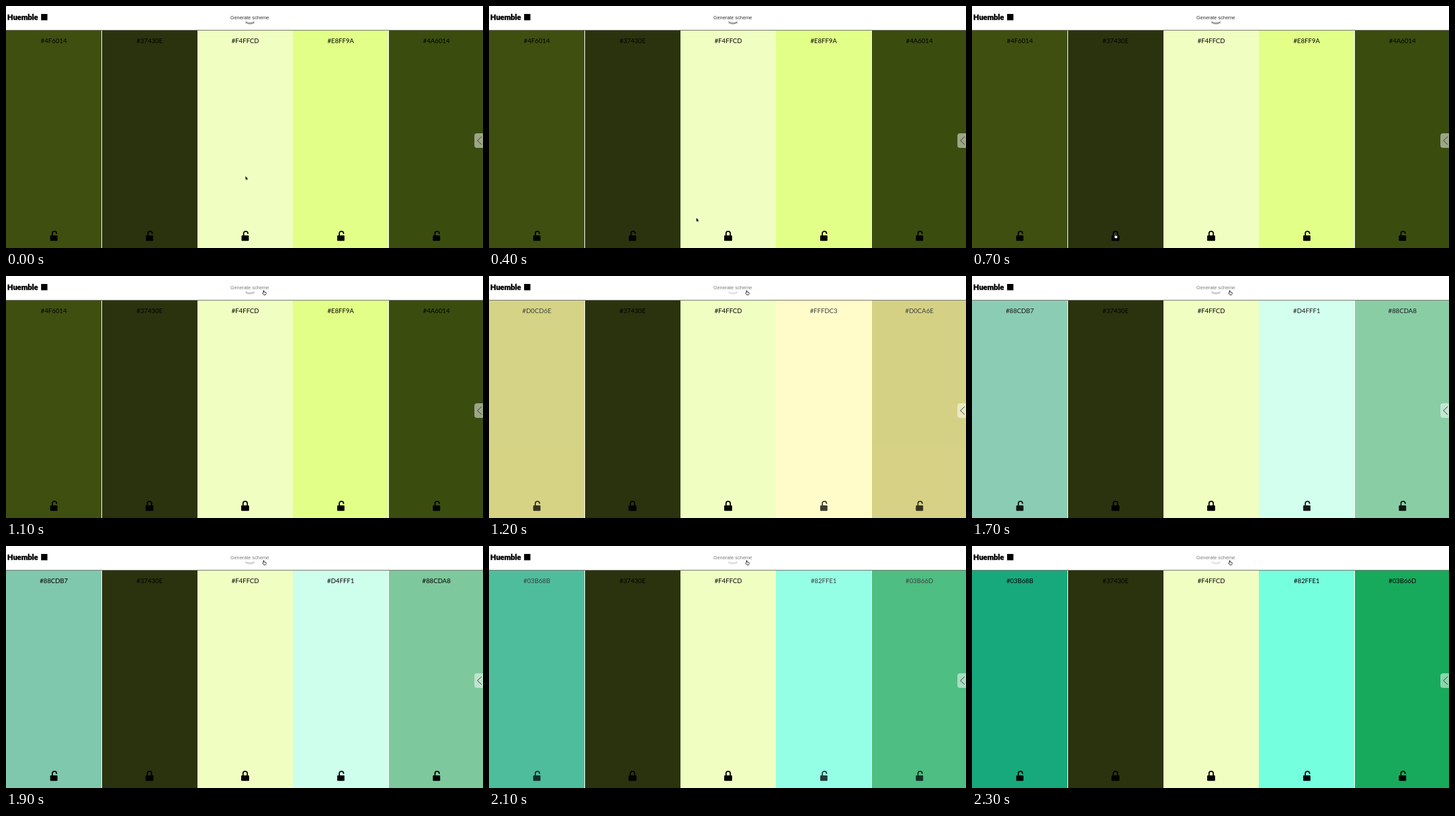
Recreate the animation shown at these times as an HTML page with a canvas. Size 720x365 px, loop 2.4 s.

```html
<!DOCTYPE html>
<html lang="en">
<head>
<meta charset="utf-8">
<title>Colour schemes</title>
<style>
  html, body { margin: 0; width: 100%; height: 100%; overflow: hidden; background: #fff; }
  #stage { position: relative; width: 720px; height: 365px; overflow: hidden; }
  #stage > * { position: absolute; }
  .name { left: 2px; top: 9px; font: 900 11.3px/15px Lato, sans-serif; color: #000; -webkit-text-stroke: .4px #000; }
  .button { left: 318px; top: 12px; width: 100px; text-align: center; white-space: nowrap;
    font: 7.35px/12px "Liberation Sans", Arial, sans-serif; color: #333; }
  .rule { left: 0; top: 36px; width: 720px; height: 1px; background: #77786f; }
  .swatch { top: 37px; height: 328px; text-align: center; color: #000;
    font: 9.7px/12px Lato, sans-serif; padding-top: 9px; box-sizing: border-box; }
  canvas { left: 0; top: 0; width: 720px; height: 365px; }
</style>
</head>
<body>
<div id="stage">
  <div class="name">Huemble</div>
  <div class="button">Generate scheme</div>
  <div class="rule"></div>
  <canvas></canvas>
</div>
<script>
const LOOP = 2400, STEP = 100, PITCH = 144.4;
const stage = document.getElementById('stage');
const canvas = document.querySelector('canvas');
const button = document.querySelector('.button');
const ctx = canvas.getContext('2d');
const ratio = window.devicePixelRatio || 1;
canvas.width = 720 * ratio;
canvas.height = 365 * ratio;

// Each scheme: start time, then [label, shown colour] per column.
const dark = ['#37430E', '#2a330e'], pale = ['#F4FFCD', '#f0ffc1'];
const schemes = [
  { at: -1000, cols: [['#4F6014', '#3f4f10'], dark, pale, ['#E8FF9A', '#e2ff88'], ['#4A6014', '#3a4d0f']] },
  { at: 1200, cols: [['#D0CD6E', '#c9c65f'], dark, pale, ['#FFFDC3', '#fffcba'], ['#D0CA6E', '#c9c35e']] },
  { at: 1600, cols: [['#88CDB7', '#7fc7ad'], dark, pale, ['#D4FFF1', '#ceffed'], ['#88CDA8', '#7dc89c']] },
  { at: 2100, cols: [['#03B68B', '#17a97c'], dark, pale, ['#82FFE1', '#74ffdf'], ['#03B66D', '#17aa5c']] }
];
const lockAt = [Infinity, 700, 300, Infinity, Infinity];

// Pointer stops: time, x, y
const path = [
  [0, 361.5, 256.5], [200, 361, 344], [300, 359, 345], [400, 313, 319.5],
  [600, 217, 346], [700, 217, 347], [1000, 388, 26], [1100, 390, 25], [LOOP, 390, 25]
];

const swatches = schemes[0].cols.map((_, i) => {
  const el = document.createElement('div');
  const left = Math.round(i * PITCH * 2) / 2;
  el.className = 'swatch';
  el.style.left = left + 'px';
  el.style.width = PITCH + 'px';
  stage.insertBefore(el, canvas);
  return el;
});

function pointerAt(t) {
  const i = path.findIndex((p, k) => k && t <= p[0]);
  const [t0, x0, y0] = path[i - 1], [t1, x1, y1] = path[i];
  const k = (t - t0) / (t1 - t0);
  return [x0 + (x1 - x0) * k, y0 + (y1 - y0) * k];
}

function line(points, color, width) {
  ctx.beginPath();
  points.forEach(([x, y]) => ctx.lineTo(x, y));
  ctx.strokeStyle = color;
  ctx.lineWidth = width;
  ctx.stroke();
}

function shape(points) {
  ctx.beginPath();
  points.forEach(([x, y]) => ctx.lineTo(x, y));
  ctx.closePath();
}

function drawLock(x, closed, alpha) {
  ctx.save();
  ctx.globalAlpha = alpha;
  ctx.fillStyle = ctx.strokeStyle = '#000';
  ctx.lineWidth = 1.8;
  const w = closed ? 12 : 11;
  ctx.beginPath();
  ctx.roundRect(x - w / 2, 346, w, 8.3, 1);
  ctx.fill();
  const cx = closed ? x : x + 0.9;
  ctx.beginPath();
  ctx.moveTo(cx - 3.2, 346);
  ctx.lineTo(cx - 3.2, 343);
  ctx.arc(cx, 343, 3.2, Math.PI, 0);
  ctx.lineTo(cx + 3.2, closed ? 346 : 343.8);
  ctx.stroke();
  ctx.restore();
}

function drawTab() {
  ctx.fillStyle = 'rgba(255,255,255,.5)';
  ctx.beginPath();
  ctx.roundRect(707, 192, 18, 22, 4);
  ctx.fill();
  line([[718, 197], [711.5, 203], [718, 209]], '#3c3f38', 1);
}

function drawChevron(alpha) {
  for (const y of [23.7, 25.2]) {
    line([[361.5, y], [365.5, y + 1.5], [368.5, y + 1.8], [371, y + 1.5], [375, y]],
      `rgba(70,70,70,${alpha})`, 1);
  }
}

function drawArrow(x, y) {
  shape([[x, y], [x, y + 5.6], [x + 1.3, y + 4.5], [x + 2.2, y + 6.5],
    [x + 3, y + 6.1], [x + 2.2, y + 4.2], [x + 3.8, y + 4.2]]);
  ctx.strokeStyle = 'rgba(255,255,255,.8)';
  ctx.lineWidth = 0.9;
  ctx.stroke();
  ctx.fillStyle = '#111';
  ctx.fill();
}

function drawHand(x, y) {
  shape([[x - 1.6, y - 3], [x - 0.5, y - 3], [x - 0.3, y - 0.8], [x + 2.6, y - 0.2],
    [x + 2.7, y + 1.6], [x + 1.9, y + 3.5], [x - 1, y + 3.5], [x - 2.8, y + 0.8], [x - 1.6, y + 0.6]]);
  ctx.fillStyle = '#fff';
  ctx.fill();
  ctx.strokeStyle = '#333';
  ctx.lineWidth = 0.9;
  ctx.stroke();
}

function render(t) {
  const scheme = schemes.filter(s => s.at <= t).pop();
  const age = t - scheme.at;
  const fade = Math.min(1, 0.76 + 0.14 * age / STEP);
  const hover = t >= 1000;

  ctx.setTransform(ratio, 0, 0, ratio, 0, 0);
  ctx.clearRect(0, 0, 720, 365);
  ctx.lineJoin = 'round';
  ctx.fillStyle = '#000';
  ctx.fillRect(53, 12, 9.5, 9.5);

  scheme.cols.forEach(([label, color], i) => {
    const locked = t >= lockAt[i], alpha = locked ? 1 : fade;
    const el = swatches[i];
    el.textContent = label;
    el.style.background = color;
    el.style.opacity = alpha;
    drawLock(72.2 + i * PITCH, locked, alpha);
  });

  drawTab();
  button.style.color = hover ? '#7c7c7c' : '#333';
  drawChevron(!hover ? 0.75 : t < 1200 ? 0.42 : 0.3 + 0.1 * Math.cos((t - 1700) / 600 * Math.PI));

  const [x, y] = pointerAt(t);
  const overLock = y > 338;
  (hover || overLock ? drawHand : drawArrow)(x, y);
}

const start = performance.now();
function tick() {
  const t = (performance.now() - start) % LOOP;
  render(Math.floor(t / STEP) * STEP);
  requestAnimationFrame(tick);
}
tick();
</script>
</body>
</html>
```
